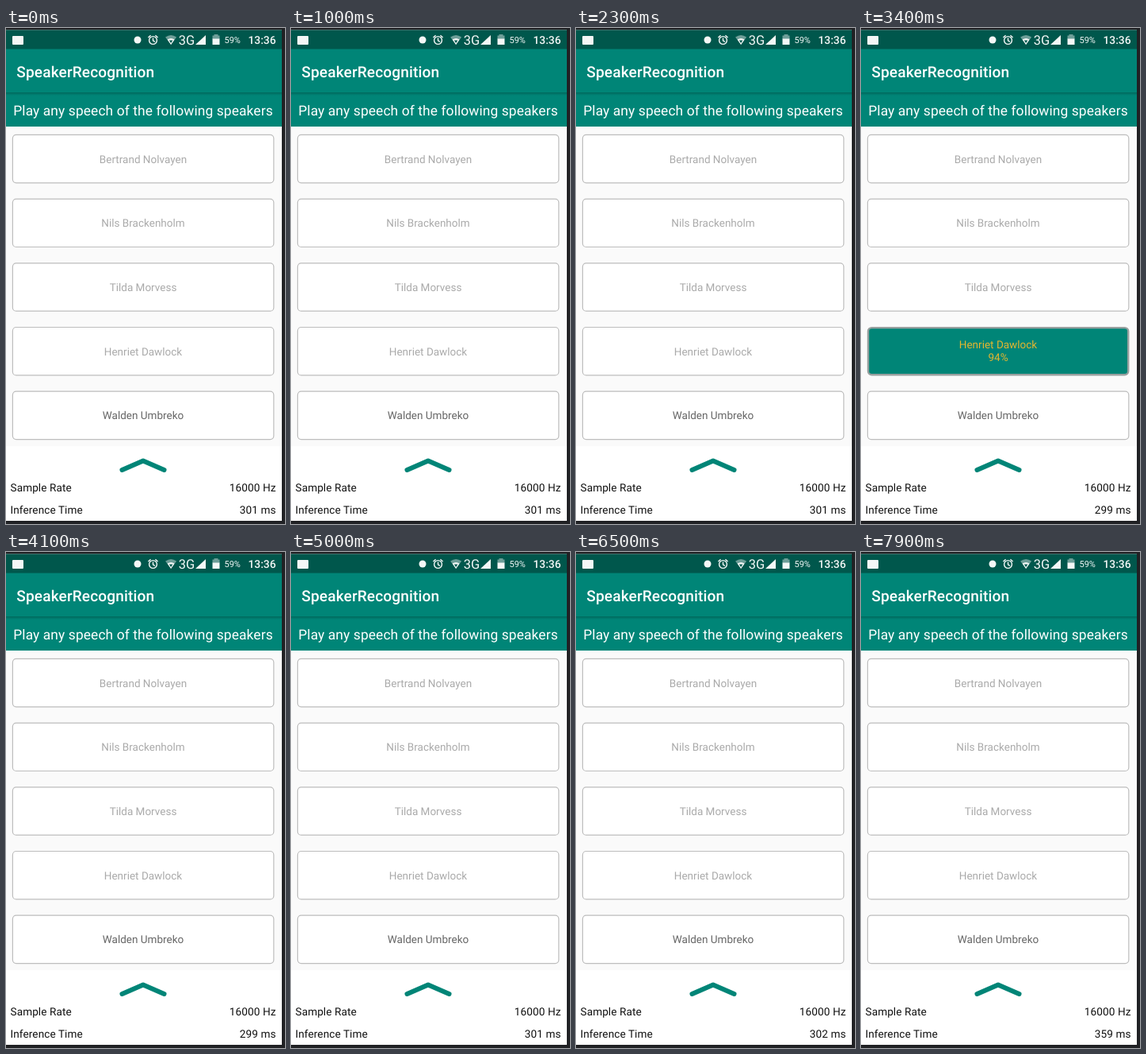
An HTML page for the animation above (8 s loop, 352 by 624 pixels).

```html
<!DOCTYPE html>
<html lang="en">
<head>
<meta charset="utf-8">
<title>Speaker recognition</title>
<style>
  html, body { margin: 0; width: 100%; height: 100%; overflow: hidden; background: #202124; }
  svg {
    display: block; width: 100%; height: 100%;
    font-family: Roboto, "Noto Sans", sans-serif;
    text-rendering: geometricPrecision;
  }
  .mid { text-anchor: middle; }
  .end { text-anchor: end; }
  .title { font-size: 19.1px; font-weight: 500; letter-spacing: .12px; }
  .heading { font-size: 17.4px; letter-spacing: .1px; }
  .stats { font-size: 13.6px; letter-spacing: .08px; fill: #111; }
  .name { font-size: 13.53px; text-anchor: middle; }
</style>
</head>
<body>
<svg viewBox="0 0 352 624">
  <defs>
    <linearGradient id="shade" x2="0" y2="1">
      <stop stop-color="#003d36" stop-opacity=".4"/>
      <stop offset="1" stop-color="#003d36" stop-opacity="0"/>
    </linearGradient>
  </defs>
  <rect width="352" height="624" fill="#202124"/>
  <rect y="2.500" width="348" height="617.500" fill="#fafafa"/>

  <!-- Status bar -->
  <rect y="2.500" width="348" height="24.500" fill="#00574c"/>
  <g fill="#f4f7f6">
    <rect x="8" y="10" width="14" height="11" rx="1"/>
    <circle cx="166" cy="15" r="4.5"/>
    <g fill="none" stroke="#f4f7f6" stroke-width="1.4">
      <circle cx="185.500" cy="15.500" r="4.9"/>
      <path d="M185.500 12.500v3.400l2.400 1.500M179.400 12l3.200-2.800M191.600 12l-3.200-2.800"/>
    </g>
    <g transform="translate(.6 0)">
      <path d="M200.500 11.500q7-5 14 0L207.500 21z" opacity=".45"/>
      <path d="M203 14.500q4.500-3 9 0L207.500 21z"/>
      <path d="M205.300 15.500h4.400L207.500 19z" fill="#00574c"/>
    </g>
    <text x="217.800" y="21.400" font-size="16.4">3G</text>
    <path d="M239 21H252V9z"/>
    <path d="M262.500 8h5v1.500h2V14h-9V9.500h2z" opacity=".45"/>
    <path d="M260.500 13.500h9V21h-9z"/>
    <text x="275.500" y="19.300" font-size="11">59%</text>
    <text class="end" x="340.500" y="20" font-size="13.8" font-weight="500">13:36</text>
  </g>

  <!-- Title and heading -->
  <rect y="26.500" width="348" height="97.500" fill="#008577"/>
  <rect y="81" width="348" height="4" fill="url(#shade)"/>
  <text class="title" x="13.300" y="61.800" fill="#fff">SpeakerRecognition</text>
  <text class="heading mid" x="173" y="109.500" fill="#fff">Play any speech of the following speakers</text>

  <g id="cards"></g>

  <!-- Bottom sheet -->
  <rect y="526" width="348" height="94" fill="#fff"/>
  <path d="M146.500 556L173 544.500L199.500 556" fill="none" stroke="#008577" stroke-width="6"
        stroke-linecap="round" stroke-linejoin="round"/>
  <g class="stats">
    <text x="5.500" y="583">Sample Rate</text>
    <text class="end" x="340.500" y="583">16000 Hz</text>
    <text x="5.500" y="611">Inference Time</text>
    <text class="end" x="340.500" y="611" id="inference"></text>
  </g>
</svg>
<script>
const LOOP = 8000;
const names = ["Bertrand Nolvayen", "Nils Brackenholm", "Tilda Morvess", "Henriet Dawlock", "Walden Umbreko"];
const DETECTED = 3;
const detections = [
  { from: 3100, to: 4000, score: "94%" },
  { from: 5300, to: 6200, score: "100%" }
];
const inferences = [[0, 301], [3100, 299], [4300, 301], [5300, 302], [6800, 359]];

function setAttrs(node, attrs) {
  for (const key in attrs) node.setAttribute(key, attrs[key]);
}

function add(tag, attrs) {
  const node = document.createElementNS("http://www.w3.org/2000/svg", tag);
  setAttrs(node, attrs);
  document.getElementById("cards").append(node);
  return node;
}

const cards = names.map((name, i) => {
  const y = 134.4 + i * 80.7;
  const idle = i === names.length - 1 ? "#666" : "#aaa";
  const box = add("rect", { rx: 4.5 });
  const label = add("text", { class: "name", x: 173 });
  const score = add("text", { class: "name", x: 173, y: y + 42.8, fill: "#e4b62f" });
  label.textContent = name;
  return { y, idle, box, label, score };
});
const inference = document.getElementById("inference");

function paintCard({ y, idle, box, label, score }, hit) {
  const inset = hit ? 0.6 : 0;
  setAttrs(box, {
    x: 8.4 + inset,
    y: y + inset,
    width: 329.4 - 2 * inset,
    height: 60.4 - 2 * inset,
    fill: hit ? "#008577" : "#fff",
    stroke: hit ? "#98a09f" : "#bdbdbd",
    "stroke-width": hit ? 2.4 : 1.2
  });
  setAttrs(label, { y: y + (hit ? 26.8 : 35.2), fill: hit ? "#e4b62f" : idle });
  score.textContent = hit ? hit.score : "";
}

function render(t) {
  const current = detections.find(d => t >= d.from && t < d.to);
  cards.forEach((card, i) => paintCard(card, i === DETECTED ? current : null));
  inference.textContent = inferences.filter(([at]) => at <= t).pop()[1] + " ms";
}

const start = performance.now();
function tick() {
  render((performance.now() - start) % LOOP);
  requestAnimationFrame(tick);
}
tick();
</script>
</body>
</html>
```
